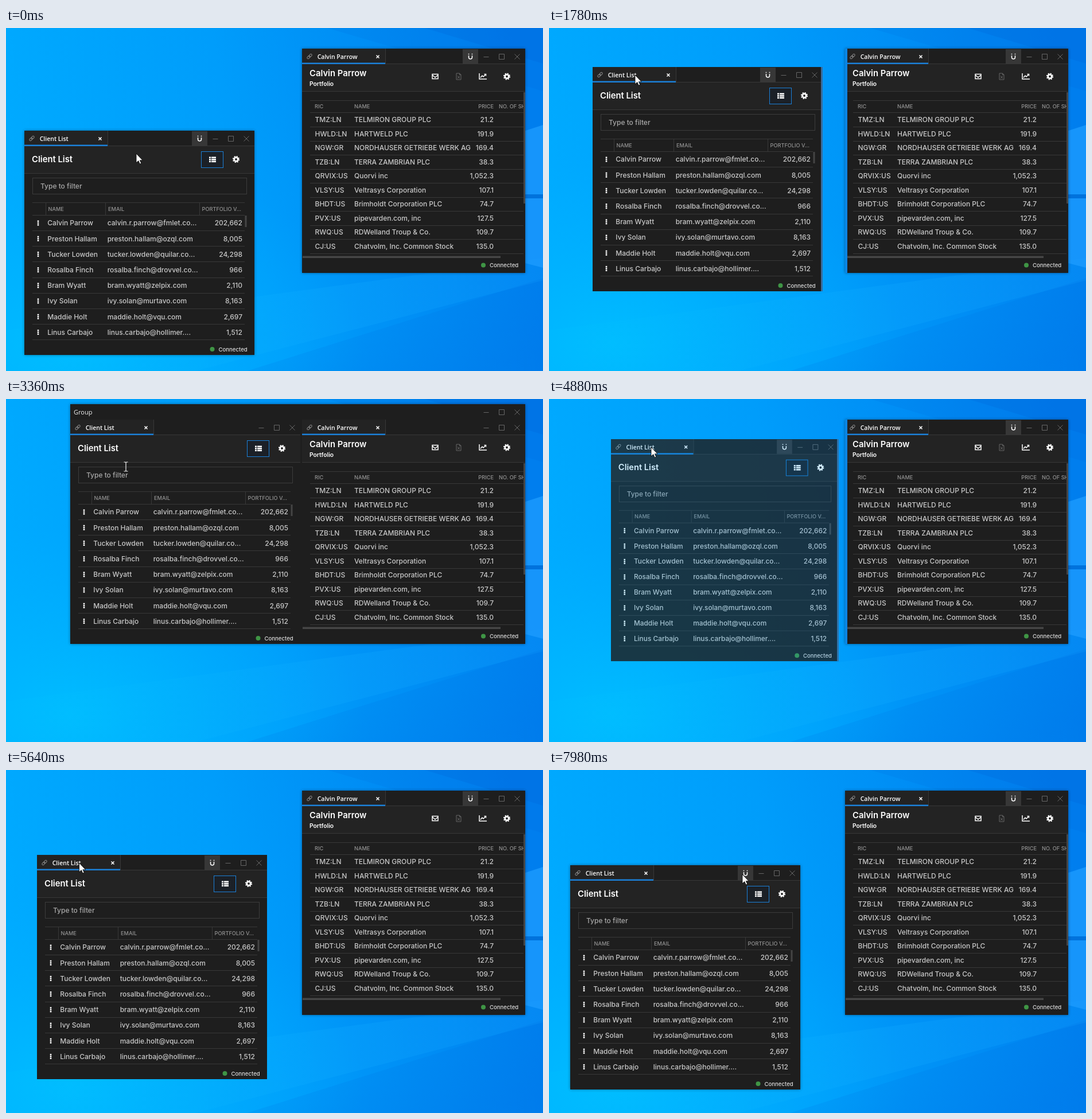
Animation of 936 by 598 pixels, one loop 8 s. Source, as an HTML page:

```html
<!DOCTYPE html>
<html lang="en">
<head>
<meta charset="utf-8">
<title>Window grouping</title>
<style>
  html, body { margin: 0; width: 100%; height: 100%; overflow: hidden; background: #0098f8; }
  svg { display: block; width: 936px; height: 598px; }
  text { font: 500 12px Inter, Roboto, sans-serif; fill: #c9c9c9; white-space: pre; }
  .tab { font: 600 10.5px "Open Sans", "Noto Sans", sans-serif; fill: #fff; }
  .group { font: 400 11px "Open Sans", "Noto Sans", sans-serif; fill: #f0f0f0; }
  .head { font-size: 14.8px; font-weight: 600; fill: #fff; }
  .sub { font-size: 10.3px; font-weight: 600; fill: #fff; }
  .col { font-size: 9.2px; fill: #939393; }
  .hint { fill: #a9a9a9; }
  .foot { font-size: 9.6px; fill: #dcdcdc; }
  .end { text-anchor: end; }
  .rule { stroke: #383838; }
  .icon { fill: none; stroke: #fff; stroke-width: 1.5; }
  .dim { stroke: #666; stroke-width: 1; }
</style>
</head>
<body>
<svg viewBox="0 0 936 598">
  <defs>
    <linearGradient id="sky" x1="0" y1=".55" x2="1" y2=".4">
      <stop offset="0" stop-color="#00abff"/>
      <stop offset=".45" stop-color="#009dfb"/>
      <stop offset=".75" stop-color="#008cf4"/>
      <stop offset="1" stop-color="#007eee"/>
    </linearGradient>
    <radialGradient id="glow" cx=".12" cy=".92" r=".55">
      <stop offset="0" stop-color="#00c0ff" stop-opacity=".85"/>
      <stop offset="1" stop-color="#00b0ff" stop-opacity="0"/>
    </radialGradient>
    <linearGradient id="beam" x1="0" x2="1">
      <stop offset="0" stop-color="#00c4ff" stop-opacity=".15"/>
      <stop offset=".6" stop-color="#10acff" stop-opacity=".25"/>
      <stop offset="1" stop-color="#12a0ff" stop-opacity=".25"/>
    </linearGradient>
    <linearGradient id="dusk" x1=".2" y1="0" x2="1" y2=".8">
      <stop offset="0" stop-color="#0070e0" stop-opacity="0"/>
      <stop offset="1" stop-color="#006ce2" stop-opacity=".3"/>
    </linearGradient>
    <filter id="soft" x="-10%" y="-10%" width="120%" height="120%"><feGaussianBlur stdDeviation="2.5"/></filter>
    <clipPath id="paneClip"><rect width="385" height="391"/></clipPath>
  </defs>

  <rect width="936" height="598" fill="url(#sky)"/>
  <rect width="936" height="598" fill="url(#glow)"/>
  <path d="M560 0H936V110Z" fill="#0058cc" opacity=".1"/>
  <path d="M730 0H936V62Z" fill="#0058cc" opacity=".18"/>
  <path d="M0 527L936 401V440L330 598H0Z" fill="url(#beam)"/>
  <path d="M936 436V598H420Z" fill="url(#dusk)"/>
  <path d="M890 184L936 169V290H890ZM890 297H936V418L890 406Z" fill="#1e9cff" opacity=".75"/>
  <path d="M890 290H936V297H890Z" fill="#0072dc"/>

  <g id="group">
    <rect x="112" y="9" width="793" height="418" filter="url(#soft)" opacity=".4"/>
    <rect x="112" y="9" width="793" height="418" fill="#1e1e1e"/>
    <text class="group" x="118" y="27">Group</text>
  </g>
  <g id="portfolio" transform="translate(516 36)"></g>
  <g id="clients"></g>
  <path id="arrow" d="M0 0V16L3.8 12.5L6.3 18L8.8 17L6.4 11.7H11.2Z" fill="#fff" stroke="#000" stroke-width=".8"/>
  <path id="beamCursor" d="M-3.5-8H-1L0-7L1-8H3.5M0-7V7M-3.5 8H-1L0 7L1 8H3.5" fill="none" stroke="#eee" stroke-width="1.2"/>
</svg>
<script>
const $ = id => document.getElementById(id);
const rect = (x, y, w, h, fill, extra = '') => `<rect x="${x}" y="${y}" width="${w}" height="${h}" fill="${fill}" ${extra}/>`;
const text = (x, y, s, cls = '') => `<text x="${x}" y="${y}" class="${cls}">${s.replace('&', '&amp;')}</text>`;
const rule = (x1, y1, x2, y2) => `<path class="rule" d="M${x1} ${y1}L${x2} ${y2}"/>`;
const icon = (x, y, d, cls = '') => `<path class="icon ${cls}" transform="translate(${x} ${y})" d="${d}"/>`;
const inset = s => `<g transform="translate(1 0)">${s}</g>`;

const gear = (x, y) => `<g transform="translate(${x} ${y})" fill="none" stroke="#fff">
  <circle r="3.3" stroke-width="2.8"/><circle r="5.2" stroke-width="1.8" stroke-dasharray="2.2 1.884"/></g>`;

const status = (x, y) => `<circle cx="${x}" cy="${y}" r="4" fill="#3f9545"/>` + text(x + 11, y + 3.5, 'Connected', 'foot');

const buttons = (w, y) =>
  icon(w - 68, y, 'M-4.5.5H4.5', 'dim') +
  icon(w - 41, y, 'M-4.5-4.5H4.5V4.5H-4.5Z', 'dim') +
  icon(w - 14, y, 'M-4.5-4.5L4.5 4.5M4.5-4.5L-4.5 4.5', 'dim');

// Shared chrome: shadow, tab, window buttons and header band
function frame(w, title) {
  const link = [-5.2, -.8].map(x => `<rect x="${x}" y="-1.8" width="6" height="3.6" rx="1.8"/>`).join('');
  return rect(0, 0, w, 391, '#000', 'class="shadow" filter="url(#soft)" opacity=".4"') +
    rect(0, 0, w, 391, '#1e1e1e') +
    rect(0, 0, 145, 25, '#232323') + rule(145.5, 0, 145.5, 26) +
    rect(0, 27, w, 47, '#232323') + rule(0, 26.5, w, 26.5) + rule(0, 74.5, w, 74.5) +
    rect(0, 24.5, 145, 2.5, '#1b80d8') +
    `<g transform="translate(13 13.5) rotate(-45)" fill="none" stroke="#8a8a8a">${link}</g>` +
    text(26.7, 17.7, title, 'tab') +
    icon(132, 14, 'M-2.5-2.5L2.5 2.5M2.5-2.5L-2.5 2.5') +
    `<g class="magnet">${rect(w - 109, 1, 27, 25, '#373737')}` +
    icon(w - 95.5, 14, 'M-3-2V1A3 3 0 0 0 3 1V-2M-3.8-4.6H-2.2M2.2-4.6H3.8') + '</g>' +
    buttons(w, 14);
}

const people = [
  ['Calvin Parrow', 'calvin.r.parrow@fmlet.co...', '202,662'],
  ['Preston Hallam', 'preston.hallam@ozql.com', '8,005'],
  ['Tucker Lowden', 'tucker.lowden@quilar.co...', '24,298'],
  ['Rosalba Finch', 'rosalba.finch@drovvel.co...', '966'],
  ['Bram Wyatt', 'bram.wyatt@zelpix.com', '2,110'],
  ['Ivy Solan', 'ivy.solan@murtavo.com', '8,163'],
  ['Maddie Holt', 'maddie.holt@vqu.com', '2,697'],
  ['Linus Carbajo', 'linus.carbajo@hollimer....', '1,512']
];
const stocks = [
  ['TMZ:LN', 'TELMIRON GROUP PLC', '21.2'],
  ['HWLD:LN', 'HARTWELD PLC', '191.9'],
  ['NGW:GR', 'NORDHAUSER GETRIEBE WERK AG', '169.4'],
  ['TZB:LN', 'TERRA ZAMBRIAN PLC', '38.3'],
  ['QRVIX:US', 'Quorvi inc', '1,052.3'],
  ['VLSY:US', 'Veltrasys Corporation', '107.1'],
  ['BHDT:US', 'Brimholdt Corporation PLC', '74.7'],
  ['PVX:US', 'pipevarden.com, inc', '127.5'],
  ['RWQ:US', 'RDWelland Troup & Co.', '109.7'],
  ['CJ:US', 'Chatvolm, Inc. Common Stock', '135.0']
];

function clientWindow() {
  let s = text(12, 54.5, 'Client List', 'head');
  s += rect(307.5, 36.5, 38, 28, '#1b2027', 'stroke="#1b80d8"');
  for (const y of [45.5, 49, 52.5]) s += rect(321, y, 3, 2.6, '#fff') + rect(325, y, 8, 2.6, '#fff');
  s += gear(368, 50);
  s += rect(13.5, 82.5, 373, 28, 'none', 'stroke="#3c3c3c"') + text(27, 100.8, 'Type to filter', 'hint');
  s += rule(13, 125.5, 383, 125.5) + rule(13, 147.5, 383, 147.5);
  for (const x of [36.5, 140.5, 304.5]) s += rule(x, 126, x, 147);
  s += text(40.5, 139.6, 'NAME', 'col') + text(145, 139.6, 'EMAIL', 'col') + text(308.5, 139.6, 'PORTFOLIO V...', 'col');
  people.forEach(([name, mail, sum], i) => {
    const y = 161 + i * 27.2;
    for (const d of [-4.5, -1.2, 2.1]) s += rect(21.7, y + d, 2.6, 2.5, '#fff');
    s += text(39.3, y + 4.3, name) + text(143.7, y + 4.3, mail) + text(379, y + 4.3, sum, 'end');
    const line = Math.round(y + 13) + .5;
    s += rule(13, line, 383, line);
  });
  s += rect(383.5, 148, 3, 20, '#444') + status(326.5, 381);
  return frame(401, 'Client List') + inset(s) + rect(398, 0, 3, 391, '#3a6c9c', 'class="strip"');
}

function portfolioWindow() {
  const owner = people[0][0];
  let s = text(12, 47.5, owner, 'head') + text(12, 65, 'Portfolio', 'sub');
  s += icon(231, 48.5, 'M-5-4H5V4H-5ZM-5-2.5L0 1.5L5-2.5');
  s += icon(272, 48.5, 'M-4-5.5H1.5L4-3V5.5H-4ZM1.5-5.5V-3H4M-2-1L2 3.5M2-1L-2 3.5', 'dim');
  s += icon(314, 48, 'M-6-5V5H7M-4 2.5L-1-1L1 1L5-3M2.5-3.5H5.5V-.5');
  s += gear(356, 48.5);
  let t = rule(13, 90.5, 385, 90.5) + rule(13, 111.5, 385, 111.5) +
    text(21, 104, 'RIC', 'col') + text(90, 104, 'NAME', 'col') +
    text(333, 104, 'PRICE', 'col end') + text(342, 104, 'NO. OF SHARES', 'col');
  stocks.forEach(([code, name, price], i) => {
    const y = 124 + i * 24.5;
    t += text(21.5, y + 4.3, code) + text(90, y + 4.3, name) + text(333, y + 4.3, price, 'end');
    const line = Math.round(y + 12) + .5;
    t += rule(13, line, 385, line);
  });
  s += `<g clip-path="url(#paneClip)">${t}</g>`;
  s += rect(385, 76, 3, 194, '#464646') + rect(0, 361.5, 345, 3.5, '#464646') + status(315, 377.5);
  return frame(389, owner) + inset(s) + rect(0, 0, 4, 391, '#0a86e6', 'class="strip"');
}

$('group').insertAdjacentHTML('beforeend', `<g transform="translate(516 9)">${buttons(389, 14)}</g>`);
$('portfolio').innerHTML = portfolioWindow();
$('clients').innerHTML = clientWindow();

const LOOP = 8000, STEP = 70;
// Active spans; the picture holds still between them
const spans = [[320, 1020], [1150, 2200], [2400, 2400], [2670, 3160], [3360, 4340], [4600, 5640], [5840, 6460], [6790, 7980]];
// time, x, y
const windowPath = [[0, 32, 179], [1080, 32, 179], [1150, 34, 176], [1290, 41, 158], [1570, 65, 98], [1780, 76, 68],
  [1920, 80, 59], [2200, 90, 46], [2400, 91, 45], [4600, 126, 46], [4740, 119, 56], [4880, 108, 70],
  [5360, 72, 122], [5640, 54, 148], [5770, 54, 148], [6460, 37, 166]];
const cursorPath = [[0, 227, 219], [250, 227, 219], [390, 226, 227], [600, 192, 217], [820, 134, 200], [1020, 107, 193]];
const cursorLater = [[2600, 165, 59], [3160, 207, 121], [3290, 207, 121], [3360, 209, 118], [3500, 218, 108],
  [3800, 212, 84], [4130, 198, 51], [4340, 201, 55], [4600, 198, 59], [4880, 178, 84], [5360, 145, 136],
  [5640, 127.5, 162], [5770, 127.5, 162], [6460, 110, 181], [6790, 110, 181], [7000, 148, 186], [7560, 314, 198], [7980, 337, 182]];

function stepped(t) {
  const span = spans.filter(([a]) => t >= a).pop();
  if (!span) return 0;
  const [a, b] = span;
  return t >= b ? b : a + Math.floor((t - a) / STEP) * STEP;
}
function along(path, t) {
  const i = path.findIndex(p => p[0] > t);
  if (i < 0) return path[path.length - 1].slice(1);
  if (i === 0) return path[0].slice(1);
  const [a, x, y] = path[i - 1], [b, u, v] = path[i], k = (t - a) / (b - a);
  return [x + (u - x) * k, y + (v - y) * k];
}
const clamp = v => Math.max(0, Math.min(1, v));
const place = (el, x, y, scale = 1) => el.setAttribute('transform', `translate(${x} ${y}) scale(${scale})`);
const show = (el, on) => { el.style.display = on ? '' : 'none'; };
const part = (id, cls) => $(id).querySelector('.' + cls);

function draw(now) {
  const t = stepped(now % LOOP);
  const grouped = t >= 2670 && t < 4740;
  const near = (t >= 1500 && t < 2670) || (t >= 4740 && t < 5430);

  let fade = 1, scale = 1;
  if (grouped) fade = t < 4600 ? clamp((t - 2600) / 280) : 1 - (t - 4530) / 210;
  else if (t >= 4740 && t < 4950) {
    const k = (t - 4740) / STEP;
    fade = .5 + .16 * k;
    scale = .97 + .01 * k;
  }
  show($('group'), grouped);
  $('group').style.opacity = fade;
  $('clients').style.opacity = fade;

  const [wx, wy] = grouped ? [112, 36] : along(windowPath, t).map(Math.round);
  place($('clients'), wx, wy, scale);
  show(part('clients', 'shadow'), t < 1150 || t >= 6790);
  show(part('portfolio', 'shadow'), !grouped);
  for (const id of ['clients', 'portfolio']) show(part(id, 'magnet'), !grouped);
  show(part('clients', 'strip'), near && (t < 2400 || t > 4600));
  show(part('portfolio', 'strip'), near);

  const dragging = t >= 1150 && t < 2670;
  const [cx, cy] = dragging ? [wx + 74, wy + 14] : along(t < 1150 ? cursorPath : cursorLater, t);
  const typing = grouped && cy >= 118;
  show($('arrow'), !typing);
  show($('beamCursor'), typing);
  place($(typing ? 'beamCursor' : 'arrow'), cx, cy);
}

function tick() {
  draw(performance.now());
  requestAnimationFrame(tick);
}
tick();
</script>
</body>
</html>
```
